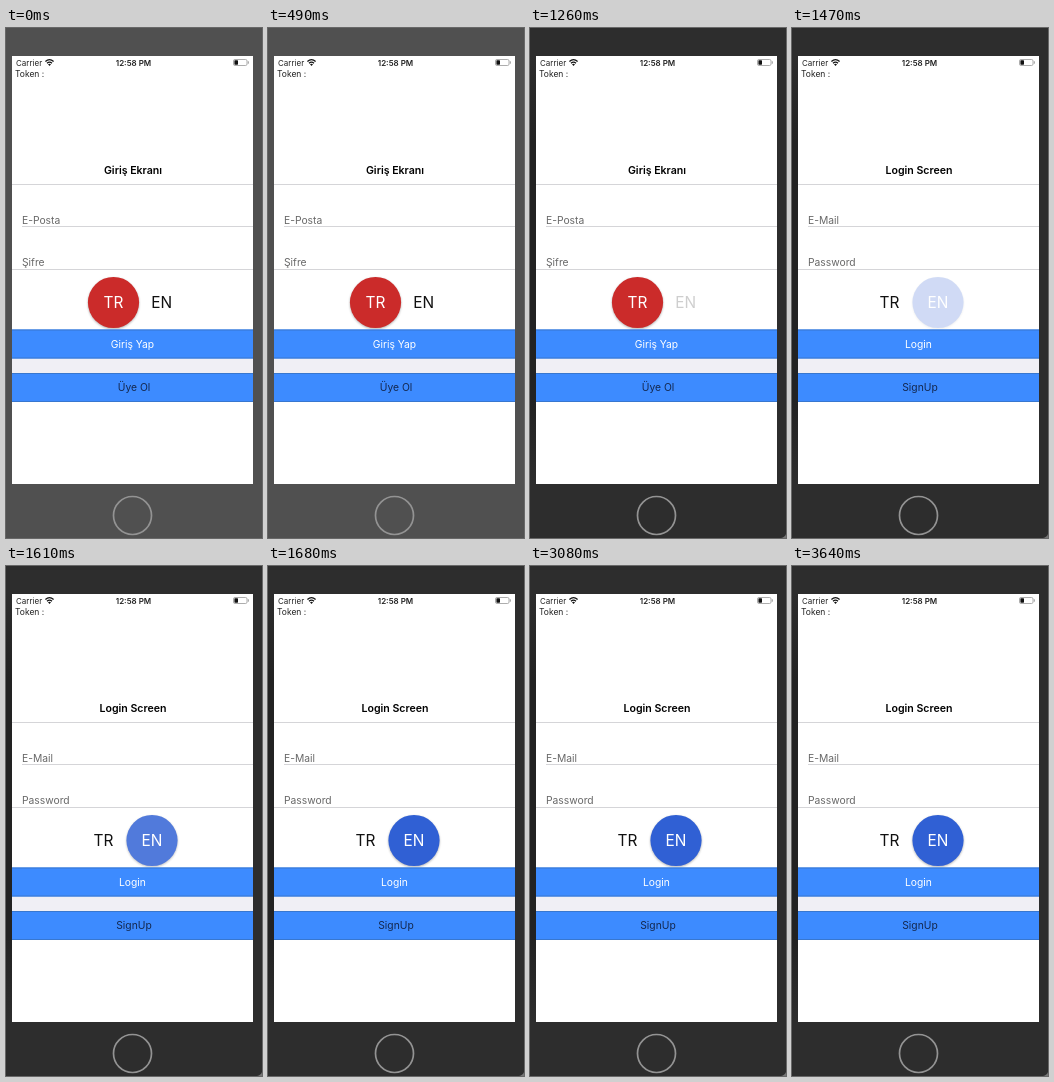
Recreate the animation shown at these times as an HTML page. Size 256x510 px, loop 3.71 s.

```html
<!DOCTYPE html>
<html lang="en">
<head>
<meta charset="utf-8">
<title>Login language switch</title>
<style>
  html, body { margin: 0; width: 100%; height: 100%; overflow: hidden; background: #505050; }
  svg { display: block; width: 256px; height: 510px; font: 10.3px Inter, Roboto, sans-serif; }
  .mid { text-anchor: middle; }
  .status { font-size: 8px; fill: #222; }
  .bold { font-weight: 600; }
  .label { fill: #686868; }
  .lang { font-size: 15.4px; text-anchor: middle; }
  .rule { stroke: #d5d5d8; stroke-width: 1; }
  .disc { filter: drop-shadow(0 1px 1px rgba(0, 0, 0, .3)); }
</style>
</head>
<body>
<svg viewBox="0 0 256 510">
  <defs>
    <linearGradient id="edge" x1="0" y1="0" x2="0" y2="1">
      <stop offset="0" stop-color="#2d2d2d"/>
      <stop offset=".2" stop-color="#222"/>
      <stop offset=".8" stop-color="#222"/>
      <stop offset="1" stop-color="#2d2d2d"/>
    </linearGradient>
  </defs>

  <rect id="body" width="256" height="510"/>
  <g id="dim">
    <rect y="28" width="6" height="428" fill="url(#edge)"/>
    <path d="M256 506V510H251Q255 509 256 506Z" fill="#777"/>
  </g>
  <circle cx="126.5" cy="487.5" r="19" fill="none" stroke="#939393" stroke-width="1.7"/>
  <rect x="6" y="28" width="241" height="428" fill="#fff"/>

  <g class="status">
    <text x="10" y="37.5">Carrier</text>
    <text x="127.5" y="37.5" class="mid bold">12:58 PM</text>
    <text x="9" y="49" font-size="8.5">Token :</text>
    <g fill="none" stroke="#111" stroke-width="1.3">
      <path d="M39.4 33.4Q43.5 29.8 47.6 33.4M41 35.2Q43.5 33 46 35.2"/>
    </g>
    <path d="M42 36.3Q43.5 35.2 45 36.3L43.5 38Z" fill="#111"/>
    <rect x="227.5" y="31.5" width="13.5" height="6" rx="1.4" fill="#fff" stroke="#999" stroke-width=".8"/>
    <rect x="228.4" y="32.3" width="3.6" height="4.4" rx=".6" fill="#111"/>
    <path d="M242.3 33.3V35.7" stroke="#999"/>
  </g>

  <text id="title" class="mid bold" x="127" y="146.3" font-size="10.6"></text>
  <path class="rule" d="M6 156.5H247M16 198.5H247M6 241.5H247"/>
  <text id="mail" class="label" x="16" y="195.7"></text>
  <text id="pass" class="label" x="16" y="238.2"></text>

  <g id="tr">
    <circle class="disc" cy="274.5" r="25.6" fill="#cb2b2a"/>
    <text class="lang" y="279.8">TR</text>
  </g>
  <g id="en">
    <circle class="disc" cy="274.5" r="25.6" fill="#3060d4"/>
    <text class="lang" y="279.6">EN</text>
  </g>

  <rect x="6" y="330" width="241" height="15" fill="#f0eff5"/>
  <g fill="#3d8bff">
    <rect x="6" y="301.5" width="241" height="29"/>
    <rect x="6" y="345" width="241" height="29"/>
  </g>
  <path d="M6 302H247M6 330H247M6 345.5H247M6 373.5H247" stroke="#3877cf"/>
  <text id="login" class="mid" y="320" x="126.5" fill="#fff"></text>
  <text id="join" class="mid" y="363" x="128" fill="#14284f"></text>
</svg>
<script>
const LOOP = 3710, STEP = 70, PRESS = 1260, RELEASE = 1440, FADE = 250, FAINT = 0.2;
const words = {
  tr: { title: 'Giriş Ekranı', mail: 'E-Posta', pass: 'Şifre', login: 'Giriş Yap', join: 'Üye Ol' },
  en: { title: 'Login Screen', mail: 'E-Mail', pass: 'Password', login: 'Login', join: 'SignUp' }
};
const el = id => document.getElementById(id);
const easeInOut = p => p < 0.5 ? 2 * p * p : 1 - 2 * (1 - p) ** 2;

function setOption(id, x, active) {
  const [disc, text] = el(id).children;
  disc.setAttribute('cx', x);
  disc.style.display = active ? '' : 'none';
  text.setAttribute('x', x);
  text.setAttribute('fill', active ? '#fff' : '#111');
}

function setLanguage(lang) {
  for (const id in words[lang]) el(id).textContent = words[lang][id];
  const turkish = lang === 'tr';
  setOption('tr', turkish ? 107.5 : 97.5, turkish);
  setOption('en', turkish ? 155.8 : 146, !turkish);
}

function touchOpacity(t) {
  if (t < PRESS) return 1;
  if (t < RELEASE) return FAINT;
  return FAINT + (1 - FAINT) * easeInOut(Math.min(1, (t - RELEASE) / FADE));
}

let shown;
function draw(now) {
  const t = Math.floor(now % LOOP / STEP) * STEP;
  const lang = t < RELEASE ? 'tr' : 'en';
  if (lang !== shown) setLanguage(shown = lang);
  const dark = t >= PRESS;
  el('body').setAttribute('fill', dark ? '#2d2d2d' : '#505050');
  el('dim').style.display = dark ? '' : 'none';
  el('en').style.opacity = touchOpacity(t);
}

const start = performance.now();
function tick() {
  draw(performance.now() - start);
  requestAnimationFrame(tick);
}
tick();
</script>
</body>
</html>
```
